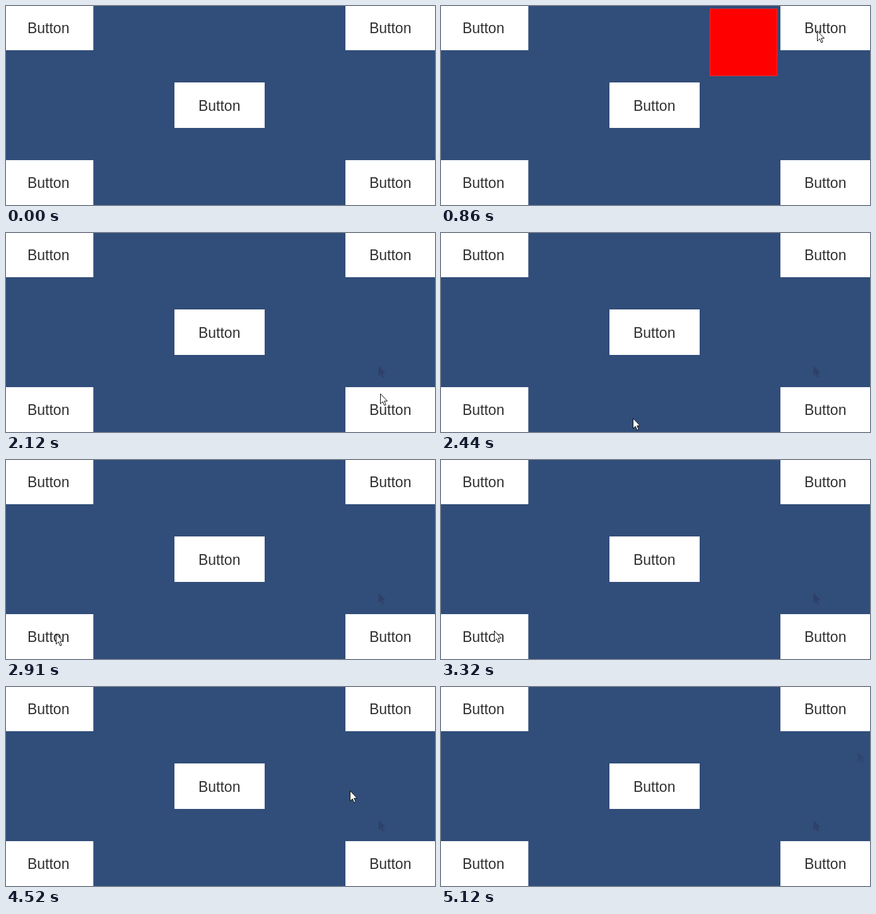
Animation of 680x315 px, one loop 5.55 s. Source, as an HTML page:

```html
<!DOCTYPE html>
<html lang="en">
<head>
<meta charset="utf-8">
<title>Button hover popups</title>
<style>
  html, body { margin: 0; width: 100%; height: 100%; overflow: hidden; background: #314d79; }
  svg { display: block; width: 680px; height: 315px; }
  .button rect { fill: #fff; }
  .button text { font: 23px "Liberation Sans", Arial, sans-serif; fill: #323232; text-anchor: middle; }
  .popup { fill: #f00; stroke: #e03238; visibility: hidden; }
  .trace { fill: #2e4168; visibility: hidden; }
  #cursor { fill: #fff; stroke: #111; visibility: hidden; }
</style>
</head>
<body>
<svg viewBox="0 0 680 315">
  <defs>
    <path id="arrow" d="M.5 .5V16.5L4.2 13L6.8 19L9.2 18L6.7 12.1H11.5Z"/>
  </defs>
  <g id="buttons"></g>
  <use class="trace" href="#arrow" x="590" y="210"/>
  <use class="trace" href="#arrow" x="660" y="102" opacity=".5"/>
  <g id="popups"></g>
  <use id="cursor" href="#arrow"/>
</svg>
<script>
const LOOP = 5550;
const NS = "http://www.w3.org/2000/svg";
const $ = id => document.getElementById(id);

const easeOut = u => 1 - (1 - u) ** 2;
const smooth = u => u * u * (3 - 2 * u);

// Pointer moves along Bézier curves; a popup opens at `opens` and closes on the next move.
const MOVES = [
  { from: 170, to: 730, ease: easeOut, curve: [[566, 312], [585, 200], [612, 90], [596, 39]],
    popup: [426, 4], opens: 860 },
  { from: 1160, to: 1680, ease: smooth, curve: [[596, 39], [594, 221], [593, 254]],
    popup: [426, 203], opens: 1880 },
  { from: 2120, to: 2860, ease: easeOut, curve: [[593, 254], [471, 322], [79, 275]],
    popup: [144, 203], opens: 3020 },
  { from: 3220, to: 3920, ease: smooth, curve: [[79, 275], [117, 261], [60, -60], [57, 27]],
    popup: [144, 4], opens: 4010 },
  { from: 4150, to: 4680, ease: smooth, curve: [[57, 27], [-50, 150], [620, 300], [633, 57]] },
  { from: 4680, to: 5120, ease: smooth, curve: [[633, 57], [668, 80], [668, 312]] }
];

function add(parent, tag, attrs) {
  const el = document.createElementNS(NS, tag);
  for (const key in attrs) el.setAttribute(key, attrs[key]);
  return parent.appendChild(el);
}

function show(el, on) {
  el.style.visibility = on ? "visible" : "hidden";
}

function addButton(col, row) {
  const g = add($("buttons"), "g", { class: "button" });
  const x = col ? 271 * col - 4 : -4.6;
  add(g, "rect", { x, y: 123 * row - 2, width: 143, height: 72 });
  add(g, "text", { x: 67.2 + 271 * col, y: 43 + 122.5 * row }).textContent = "Button";
}

for (const row of [0, 2]) for (const col of [0, 2]) addButton(col, row);
addButton(1, 1);

for (const move of MOVES) {
  if (!move.popup) continue;
  const [x, y] = move.popup;
  move.box = add($("popups"), "rect",
    { class: "popup", x: x + .5, y: y + .5, width: 106, height: 106 });
}

// De Casteljau: blend neighbouring points until one is left.
function bezier(points, u) {
  if (points.length === 1) return points[0];
  const next = points.slice(1).map(([x, y], i) =>
    [points[i][0] * (1 - u) + x * u, points[i][1] * (1 - u) + y * u]);
  return bezier(next, u);
}

const traces = document.querySelectorAll(".trace");

function draw(time) {
  const t = time % LOOP;
  const move = MOVES.findLast(m => t >= m.from);
  const visible = Boolean(move) && t < MOVES.at(-1).to;
  show($("cursor"), visible);
  if (visible) {
    const u = Math.min(1, (t - move.from) / (move.to - move.from));
    const [x, y] = bezier(move.curve, move.ease(u)).map(Math.round);
    $("cursor").setAttribute("transform", `translate(${x} ${y})`);
  }
  for (const m of MOVES) if (m.box) show(m.box, m === move && t >= m.opens);
  show(traces[0], t >= 1500);
  show(traces[1], t >= 4890);
}

let start;
function tick(now) {
  start ??= now;
  draw(now - start);
  requestAnimationFrame(tick);
}
draw(0);
requestAnimationFrame(tick);
</script>
</body>
</html>
```
